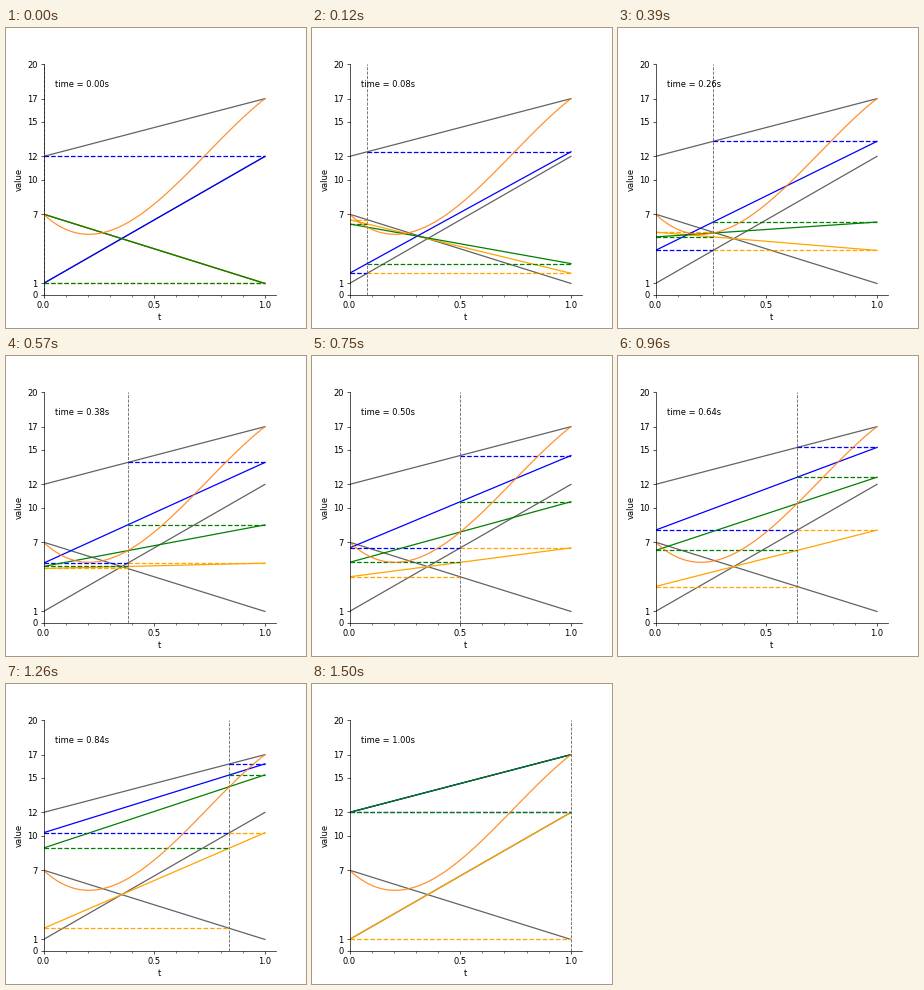
A matplotlib script for the animation above (1530 ms loop, 300x300 px).

```python
import numpy as np
import matplotlib.pyplot as plt
from matplotlib.animation import FuncAnimation

POINTS = (7, 1, 12, 17)
STEPS = 50
GRAY = "#636363"


def lerp(a, b, t):
    return a + (b - a) * t


def reduce_levels(t):
    """De Casteljau: every level of interpolated values at time t."""
    levels = [POINTS]
    while len(levels[-1]) > 1:
        last = levels[-1]
        levels.append([lerp(a, b, t) for a, b in zip(last, last[1:])])
    return levels


fig, ax = plt.subplots(figsize=(5, 5), dpi=60)
ax.set(xlim=(0, 1.05), ylim=(0, 20), xlabel="t", ylabel="value")
ax.set_xticks([0, 0.5, 1])
ax.set_xticks(np.arange(11) / 10, minor=True)
ax.set_yticks([0, 1, 7, 10, 12, 15, 17, 20])
ax.spines[["top", "right"]].set_visible(False)


def new_line(color, style="-", z=2.0):
    return ax.plot([], [], color=color, ls=style, lw=1.5, zorder=z)[0]


for a, b in zip(POINTS, POINTS[1:]):
    ax.plot([0, 1], [a, b], color=GRAY, lw=1.5, zorder=2)

ts = np.linspace(0, 1, 101)
ax.plot(ts, [reduce_levels(t)[3][0] for t in ts], color="tab:orange",
        alpha=0.85, lw=1.5, zorder=2.4)

marker = ax.axvline(0, color=GRAY, ls="--", lw=1, zorder=2.05)
label = ax.text(0.05, 18, "")

# One solid segment per pair, with a dashed level for each of its ends.
segments = []
for level, index, color, z in ((1, 0, "orange", 2.1), (1, 1, "blue", 2.15),
                               (2, 0, "green", 2.2)):
    lines = [new_line(color, s, z) for s in ("-", "--", "--")]
    segments.append((level, index, lines))


def update(frame):
    t = frame / STEPS
    levels = reduce_levels(t)
    for level, index, (solid, left, right) in segments:
        a, b = levels[level][index:index + 2]
        solid.set_data([0, 1], [a, b])
        left.set_data([0, t], [a, a])
        right.set_data([t, 1], [b, b])
    marker.set_xdata([t, t])
    label.set_text(f"time = {t:.2f}s")


anim = FuncAnimation(fig, update, frames=STEPS + 1, init_func=lambda: update(0),
                     interval=30, repeat=True, repeat_delay=0)
plt.show()
```
